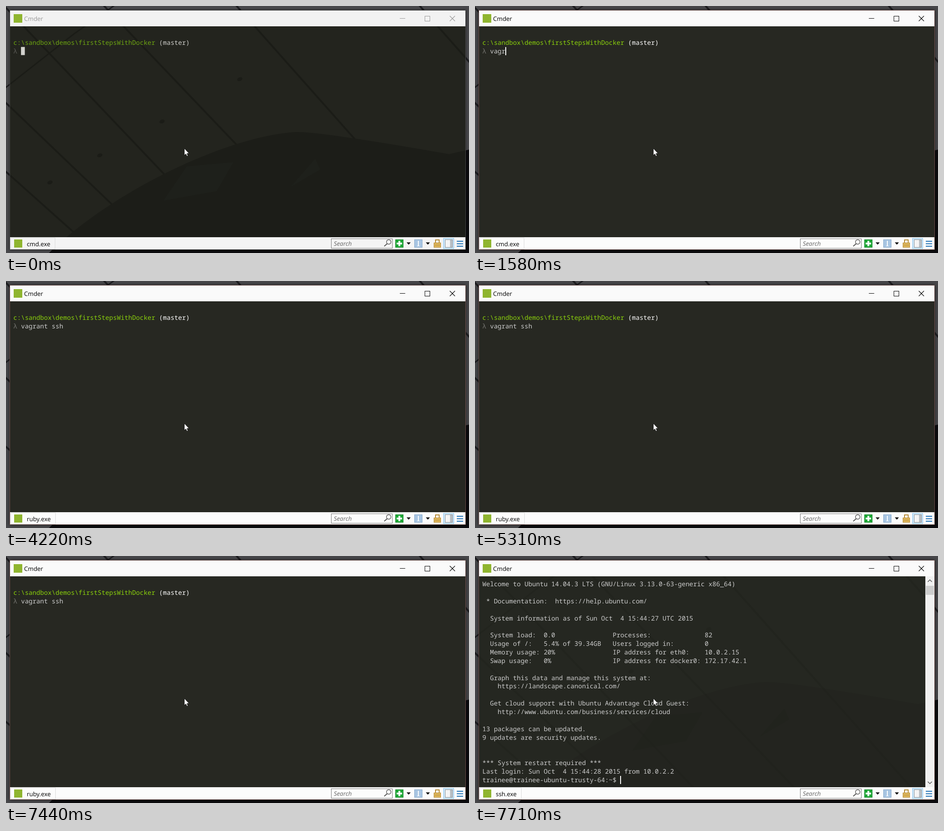
Animation of 1024 by 547 pixels, one loop 8000 ms. Source, as an HTML page with a canvas:

```html
<!DOCTYPE html>
<html lang="en">
<head>
<meta charset="utf-8">
<title>Terminal session</title>
<style>
  html, body { margin: 0; width: 100%; height: 100%; overflow: hidden; background: #1b1b1d; }
  canvas { display: block; width: 100%; height: 100%; }
</style>
</head>
<body>
<canvas id="stage" width="1024" height="547"></canvas>
<script>
const ctx = document.getElementById('stage').getContext('2d');
const MONO = '14.13px "Noto Sans Mono", "DejaVu Sans Mono", monospace';
const UI = '13.4px "Open Sans", "Noto Sans", sans-serif';
const CELL = 8.48, ROW = 18.85, LEFT = 16.2, TOP = 53;
const GREEN = '#8fb52f';

const LOOP = 8000, FOCUS = 500, LOGIN = 7560, SCROLLBAR = 7710;
const BLINK_START = 3160, BLINK = 530, ENTER = BLINK_START + BLINK;
const KEY_GAP = 125;
const BURSTS = [[1050, 'v'], [1330, 'agr'], [1730, 'ant'], [2120, ' '], [2520, 'ssh']];
const TABS = [[0, 'cmd.exe'], [4220, 'ruby.exe'], [6300, 'VBoxManage.exe'],
  [6730, 'ruby.exe'], [SCROLLBAR, 'ssh.exe']];

const WELCOME = `Welcome to Ubuntu 14.04.3 LTS (GNU/Linux 3.13.0-63-generic x86_64)

 * Documentation:  https://help.ubuntu.com/

  System information as of Sun Oct  4 15:44:27 UTC 2015

  System load:  0.0               Processes:              82
  Usage of /:   5.4% of 39.34GB   Users logged in:        0
  Memory usage: 20%               IP address for eth0:    10.0.2.15
  Swap usage:   0%                IP address for docker0: 172.17.42.1

  Graph this data and manage this system at:
    https://landscape.canonical.com/

  Get cloud support with Ubuntu Advantage Cloud Guest:
    http://www.ubuntu.com/business/services/cloud

13 packages can be updated.
9 updates are security updates.


*** System restart required ***
Last login: Sun Oct  4 15:44:28 2015 from 10.0.2.2
trainee@trainee-ubuntu-trusty-64:~$ `.split('\n');

function rect(x, y, w, h, color) {
  ctx.fillStyle = color;
  ctx.fillRect(x, y, w, h);
}

function box(x, y, w, h, fill, border) {
  rect(x, y, w, h, border);
  rect(x + 1, y + 1, w - 2, h - 2, fill);
}

function path(points) {
  ctx.beginPath();
  for (let i = 0; i < points.length; i += 2) ctx.lineTo(points[i], points[i + 1]);
}

function poly(color, ...points) {
  path(points);
  ctx.closePath();
  ctx.fillStyle = color;
  ctx.fill();
}

function line(color, width, ...points) {
  path(points);
  ctx.strokeStyle = color;
  ctx.lineWidth = width;
  ctx.stroke();
}

function label(str, x, y, color, style = '') {
  ctx.font = style + UI;
  ctx.fillStyle = color;
  ctx.fillText(str, x, y);
}

function print(str, col, row, color) {
  const y = Math.round(TOP + 14.2 + row * ROW);
  ctx.font = MONO;
  ctx.fillStyle = color;
  [...str].forEach((ch, i) => ctx.fillText(ch, LEFT + (col + i) * CELL, y));
}

// wooden planks with a dark rounded silhouette in front
function wallpaper(plank, gap, dark, shine) {
  rect(0, 0, 1024, 547, plank);
  // each gap runs from x at the top of the pane to x at mid height
  for (const [x1, x2] of [[-360, -75], [-177, 89], [39, 281], [260, 503], [550, 776], [955, 1180]]) {
    const dx = x2 - x1;
    line(gap, 4, x1 - dx, -210, x2 + dx, 555);
  }
  line(gap, 3, -5, 184, 150, 62, 245, -5);
  for (let i = 0, x = 517; i < 4; x -= 172 * 0.8 ** i++) {
    ctx.beginPath();
    ctx.ellipse(x, 162 + (517 - x) * 0.545, 6, 4, -0.4, 0, 7);
    ctx.fillStyle = gap;
    ctx.fill();
  }
  ctx.beginPath();
  ctx.moveTo(95, 547);
  ctx.bezierCurveTo(230, 415, 480, 290, 640, 279);
  ctx.quadraticCurveTo(690, 277, 980, 328);
  ctx.lineTo(1024, 318);
  ctx.lineTo(1024, 547);
  ctx.fillStyle = dark;
  ctx.fill();
  poly(shine, 348, 431, 400, 355, 503, 346, 466, 410);
  poly(shine, 630, 400, 684, 338, 695, 362);
}

function titleBar(active) {
  const ink = active ? '#000' : '#999';
  rect(9, 10, 1007, 35, active ? '#fafafa' : '#f2f2f2');
  rect(17, 18, 19, 19, GREEN);
  label('Cmder', 40, 33, ink);
  rect(871, 27, 12, 1, ink);
  box(926, 22, 12, 12, active ? '#fafafa' : '#f2f2f2', ink);
  line(ink, 1.1, 981.5, 22, 993, 33.5);
  line(ink, 1.1, 993, 22, 981.5, 33.5);
}

function statusBar(active, tab) {
  const paper = active ? '#fcfcfc' : '#f4f4f4';
  rect(9, 512, 1007, 27, paper);
  ctx.font = UI;
  const tabWidth = Math.round(ctx.measureText(tab).width) + 47;
  box(10, 513, tabWidth, 26, paper, '#d9d9d9');
  rect(18, 517, 18, 18, GREEN);
  label(tab, 46, 532, '#000');

  box(719, 515, 136, 22, paper, '#777');
  label('Search', 725, 531, '#666', 'italic ');
  ctx.beginPath();
  ctx.arc(846.5, 522.5, 5, 0, 7);
  ctx.strokeStyle = '#555';
  ctx.lineWidth = 1.3;
  ctx.stroke();
  line('#555', 2, 843, 526.5, 836.5, 532);

  box(861, 517, 18, 18, '#20a838', '#148a2a');
  rect(868, 520, 4, 12, '#fff');
  rect(864, 524, 12, 4, '#fff');

  box(903, 517, 18, 18, '#a8c5e2', '#86a9cc');
  rect(911, 520, 2, 12, '#fff');
  rect(909, 531, 6, 1, '#fff');
  for (const x of [886, 928.5]) poly('#000', x, 523.5, x + 9, 523.5, x + 4.5, 528.5);

  line('#b58a35', 2, 950, 526, 950, 518, 958, 518, 958, 526);
  box(946, 524, 16, 11, '#dcb55c', '#b58a35');
  rect(948, 529, 12, 1, '#b58a35');

  box(967, 514, 24, 24, '#cde6f8', '#8fc6ee');
  box(971, 517, 17, 18, '#f4f4f4', '#8d9499');
  rect(982, 518, 5, 16, '#b9bfc4');

  for (let i = 0; i < 3; i++) rect(997, 520 + i * 5.5, 14, 2, '#1b6fb5');
}

function scrollBar() {
  rect(996, 45, 20, 467, '#f0f0f0');
  rect(997, 66, 18, 20, '#cdcdcd');
  for (const [y, tip] of [[55, -2.2], [502, 2.2]]) {
    line('#555', 1.6, 1001.5, y - tip, 1006, y + tip, 1010.5, y - tip);
  }
}

function pointer() {
  const shape = [394.5, 315.5, 394.5, 330.5, 397.8, 327.6, 400.2, 332.6, 402.4, 331.5,
    400.2, 326.8, 404.6, 326.3];
  poly('#fff', ...shape);
  line('#111', 0.8, ...shape, 394.5, 315.5);
}

function typedAt(t) {
  return BURSTS.map(([start, keys]) =>
    keys.slice(0, Math.max(0, Math.floor((t - start) / KEY_GAP) + 1))).join('');
}

function caret(t, col, row, active) {
  const x = LEFT + col * CELL, y = TOP + row * ROW;
  const blinkedOff = t >= BLINK_START && Math.floor((t - BLINK_START) / BLINK) % 2 === 0;
  if (!active) rect(x, y, CELL, 18, '#d2d2ce');
  else if (t >= LOGIN || !blinkedOff) rect(Math.round(x), Math.round(y), 2, 18, '#fff');
}

function terminal(t, active) {
  ctx.save();
  ctx.beginPath();
  ctx.rect(9, 45, 1007, 467);
  ctx.clip();
  rect(9, 45, 1007, 467, '#272822');
  if (!active || t >= SCROLLBAR) {
    ctx.globalAlpha = active ? 0.25 : 1;
    wallpaper('#23241e', '#1b1c17', '#1c1d18', '#1e201b');
  }
  ctx.restore();

  if (t >= LOGIN) {
    WELCOME.forEach((str, row) => print(str, 0, row, '#ccc'));
    caret(t, WELCOME.at(-1).length, WELCOME.length - 1, active);
    return;
  }
  const typed = typedAt(t);
  print('c:\\sandbox\\demos\\firstStepsWithDocker', 0, 1, active ? '#8ad00c' : '#6ca312');
  print('(master)', 38, 1, active ? '#fff' : '#cfcfcb');
  print('λ', 0, 2, active ? '#777772' : '#5c5c57');
  print(typed, 2, 2, '#ccc');
  if (t >= ENTER) caret(t, 0, 3, active);
  else caret(t, 2 + typed.length, 2, active);
}

function draw(t) {
  const active = t >= FOCUS;
  const tab = TABS.filter(([start]) => t >= start).pop()[1];
  ctx.textRendering = 'geometricPrecision';
  wallpaper('#48484b', '#1d1d20', '#0b0b0e', '#0b0b0e');
  ctx.save();
  ctx.shadowColor = 'rgba(0,0,0,0.5)';
  ctx.shadowBlur = active ? 9 : 5;
  rect(8, 9, 1009, 531, active ? '#6b4c48' : '#444');
  ctx.restore();
  terminal(t, active);
  titleBar(active);
  statusBar(active, tab);
  if (t >= SCROLLBAR) scrollBar();
  pointer();
}

const start = performance.now();
function tick() {
  draw((performance.now() - start) % LOOP);
  requestAnimationFrame(tick);
}
tick();
</script>
</body>
</html>
```
